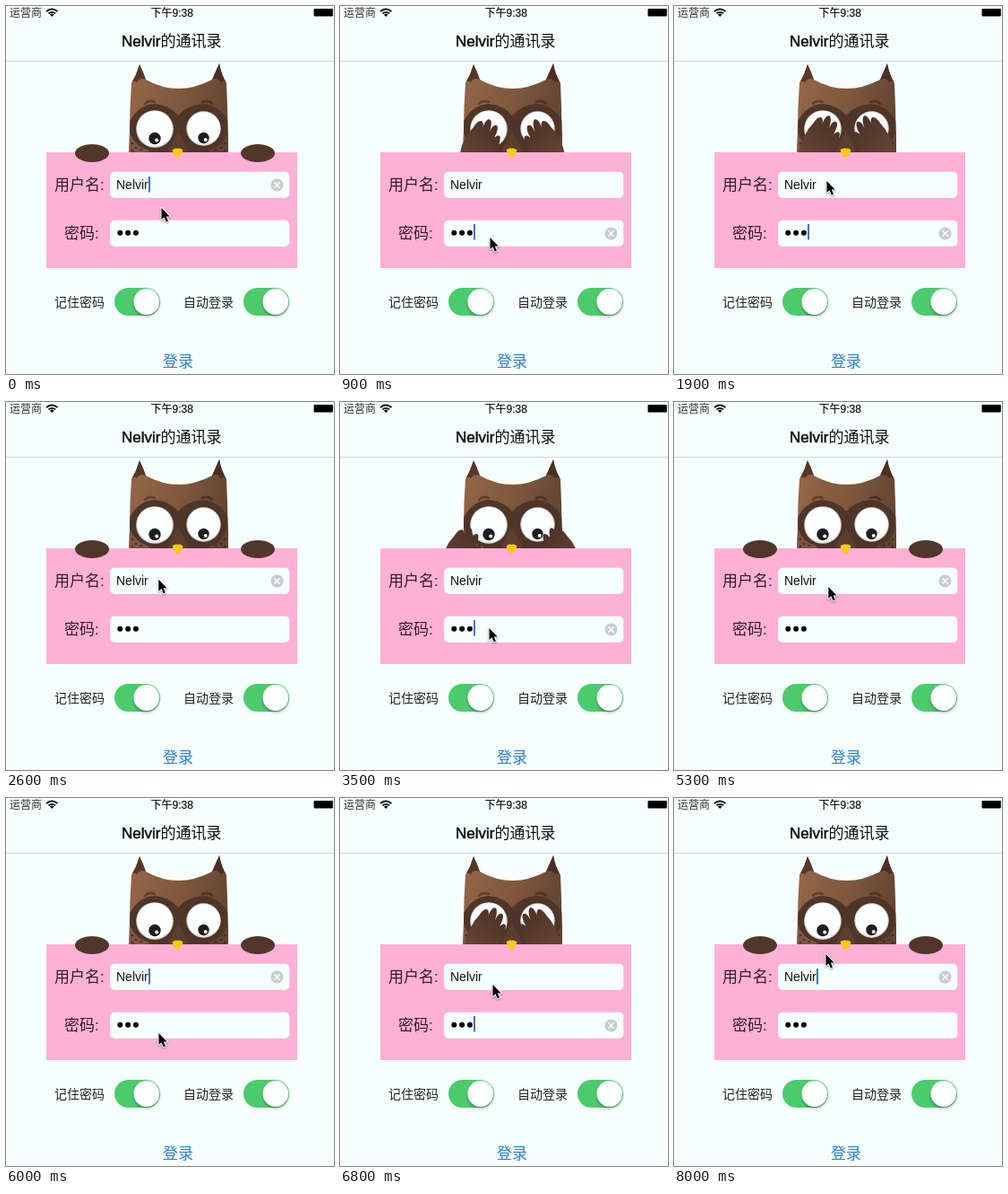
Animation, 366 px wide and 410 px high, one loop 8100 ms. Source, as an HTML page with a canvas:

```html
<!DOCTYPE html>
<html lang="zh">
<head>
<meta charset="utf-8">
<title>登录</title>
<style>
html, body { margin: 0; width: 100%; height: 100%; overflow: hidden; background: #f5fffe; }
canvas { display: block; width: 366px; height: 410px; }
</style>
</head>
<body>
<canvas id="stage"></canvas>
<script>
const W = 366, H = 410, LOOP = 8100;
const USER = 'Nelvir';
const PAPER = '#f5fffe', PINK = '#ffb0d6', GREEN = '#4ccb6d', DARK = '#51372a';
const FONT = '"Liberation Sans", "Noto Sans CJK SC", "Noto Sans CJK", sans-serif';

const canvas = document.getElementById('stage');
const c = canvas.getContext('2d');
const dpr = window.devicePixelRatio || 1;
canvas.width = W * dpr;
canvas.height = H * dpr;

// Focus moves between the fields; each change raises or lowers the wings.
const MOVE = 400;
const focusAt = [[580, 'pass'], [2020, 'user'], [3290, 'pass'],
                 [4530, 'user'], [6060, 'pass'], [7320, 'user']];
const caretOff = [[200, 580], [1050, 1400], [2520, 2900], [3780, 4080],
                  [5150, 5500], [7000, 7320], [7700, 8000]];
// time, x, y of the pointer tip
const pointer = [[0, 173, 224], [300, 167, 257], [1100, 167, 257], [1900, 170, 194],
                 [2500, 170, 194], [3250, 166, 251], [3800, 166, 251], [4400, 172, 198],
                 [5100, 172, 198], [5900, 171, 243], [6000, 170, 261], [6300, 170, 261],
                 [6800, 170, 207], [7000, 169, 192], [7900, 169, 192], [8000, 169, 173]];

const clamp = v => Math.max(0, Math.min(1, v));
const ease = v => v * v * (3 - 2 * v);

function fill(color, draw) {
  c.beginPath();
  draw();
  c.fillStyle = color;
  c.fill();
}

function ellipse(x, y, rx, ry, color) {
  fill(color, () => c.ellipse(x, y, rx, ry, 0, 0, 7));
}

function rounded(x, y, w, h, r, color) {
  fill(color, () => c.roundRect(x, y, w, h, r));
}

function line(color, width, d) {
  c.strokeStyle = color;
  c.lineWidth = width;
  c.lineCap = 'round';
  c.stroke(new Path2D(d));
}

function shape(color, d) {
  c.fillStyle = color;
  c.fill(new Path2D(d));
}

function text(str, x, y, size, color = '#111', weight = 300, bold = 0) {
  c.font = weight + ' ' + size + 'px ' + FONT;
  c.fillStyle = c.strokeStyle = color;
  c.fillText(str, x, y);
  if (bold) {
    c.lineWidth = bold;
    c.strokeText(str, x, y);
  }
  return c.measureText(str).width;
}

function statusBar() {
  text('运营商', 4, 11.5, 12, '#333');
  for (const r of [9.5, 6.2]) {
    c.beginPath();
    c.arc(51.3, 12, r - 1, -Math.PI * 0.76, -Math.PI * 0.24);
    c.strokeStyle = '#111';
    c.lineWidth = 1.8;
    c.lineCap = 'butt';
    c.stroke();
  }
  shape('#111', 'M51.3 12 L48.9 9.6 Q51.3 7.6 53.7 9.6 Z');
  text('下午9:38', 161.5, 11.5, 12, '#111', 400, 0.2);
  const nameWidth = text(USER, 129, 45, 17, '#111', 400, 0.5);
  text('的通讯录', 129 + nameWidth, 45, 17, '#111', 400);
  rounded(343.5, 3, 21.3, 8.5, 1, '#000');
  c.fillStyle = '#d0d8d7';
  c.fillRect(0, 61, W, 1);
}

function eye(x, y, r, pupil) {
  ellipse(x, y, r, r, '#d5dbda');
  ellipse(x, y - 0.3, r - 1.2, r - 1.2, '#fdffff');
  ellipse(x, y + 10.5, pupil, pupil, '#201d1d');
  ellipse(x + 2.2, y + 12.5, 2, 2, '#f5f7f7');
}

function owl() {
  const coat = c.createLinearGradient(138, 90, 248, 120);
  coat.addColorStop(0, '#936648');
  coat.addColorStop(0.5, '#80583d');
  coat.addColorStop(1, '#624533');
  shape(coat, 'M137.5 164 L138.5 112 L140 86 Q146 76 149 65 Q153 73 156 82 ' +
    'Q192 102 230 82 Q234 73 238 64 Q240 76 246 86 L247 112 L248 164 Z');
  shape('#553829', 'M140 86 Q146 76 149 65 Q153 73 156 82 Q150 79 146 85 Q142 82 140 86 Z');
  shape('#492f24', 'M246 86 Q240 76 238 64 Q234 73 230 82 Q236 79 240 85 Q244 82 246 86 Z');
  line('#60402e', 2.5, 'M155 109 Q159 104 166 107');
  line('#4f3326', 2.5, 'M230 109 Q226 104 219 107');
  shape('#4f3527', 'M138.3 128 Q148 110 166 109 Q184 111 192 122 ' +
    'Q201 111 219 109 Q238 110 247.3 128 L248 164 L137.5 164 Z');
  shape('#7d563e', 'M138 140 Q143 156 158 160 L161 164 L137.5 164 Z');
  shape('#614331', 'M247.6 140 Q242 156 228 160 L225 164 L248 164 Z');
  shape('#5a3e2e', 'M192 140 Q184 152 180 164 L204 164 Q200 152 192 140 Z');
  for (const [x, y] of [[141, 153], [145, 158], [151, 160], [141, 161]]) {
    ellipse(x, y, 1.5, 1.3, '#4d3326');
    ellipse(385 - x, y, 1.5, 1.3, '#432c22');
  }
  eye(166, 137, 20.8, 6.7);
  eye(220.5, 136.5, 19.2, 6.2);
}

// Feathered hand in its own 45 x 65 box; the right one is mirrored.
function wing(x, y, flip) {
  c.save();
  c.translate(x, y);
  c.scale(flip, 1);
  const down = c.createLinearGradient(0, 46, 38, 10);
  down.addColorStop(0, '#644734');
  down.addColorStop(1, '#4c3226');
  shape(down, 'M-1 65 Q-2 38 6 27 Q9 20 15 14 Q20 6 24 7 Q28 9 24 18 ' +
    'Q28 5 33 5 Q37 7 33 19 Q37 10 41 12 Q44 15 38 26 Q43 21 45 25 ' +
    'Q44 38 36 46 L33 65 Z');
  c.restore();
}

function wings(p) {
  const q = 1 - p;
  c.save();
  c.beginPath();
  c.rect(0, 62, W, 101);
  c.clip();
  wing(140 - 60 * q, 117 + 40 * q, 1);
  wing(245.5 + 50 * q, 117 + 40 * q, -1);
  c.restore();
}

function clearButton(y) {
  ellipse(302.5, y, 7, 7, '#c9cccc');
  line('#fff', 1.5, `M299.8 ${y - 2.7} l5.4 5.4 m0 -5.4 l-5.4 5.4`);
}

function form(focus, caret) {
  c.fillStyle = PINK;
  c.fillRect(45, 163, 280, 129);
  for (const y of [184.5, 238.5]) {
    rounded(116, y, 200.5, 29.5, 5, '#f3e4ec');
    rounded(116.6, y + 0.6, 199.3, 28.3, 4.5, PAPER);
  }
  text('用户名:', 54, 205, 17, '#321c28');
  text('密码', 65, 259, 17, '#321c28');
  text(':', 99, 259, 17, '#321c28');
  text(USER, 123, 204, 14);
  for (let i = 0; i < 3; i++) ellipse(127.3 + 8.8 * i, 252.8, 3, 3, '#000');

  const onUser = focus === 'user';
  clearButton(onUser ? 199.5 : 253.5);
  if (caret) {
    c.fillStyle = '#476fd0';
    c.fillRect(onUser ? 159 : 149, onUser ? 190 : 243, 2, 17.5);
  }
}

function toggle(x) {
  rounded(x, 314, 51, 31, 15.5, GREEN);
  c.save();
  c.shadowColor = 'rgba(0,0,0,.3)';
  c.shadowBlur = 3 * dpr;
  c.shadowOffsetY = 2 * dpr;
  ellipse(x + 35.8, 329.5, 14.4, 14.4, '#fbffff');
  c.restore();
}

function arrow(x, y) {
  c.save();
  c.translate(x - 0.5, y);
  c.lineJoin = 'round';
  const tip = 'M1 1 V14 L4 11.2 L6.3 16.4 L8.5 15.5 L6.3 10.4 H10.2 Z';
  c.shadowColor = 'rgba(0,0,0,.4)';
  c.shadowBlur = 2 * dpr;
  c.shadowOffsetY = dpr;
  line('#fff', 2, tip);
  c.shadowColor = 'transparent';
  shape('#000', tip);
  c.restore();
}

function pointerPos(t) {
  const i = pointer.findIndex(k => k[0] > t);
  if (i < 0) return pointer[pointer.length - 1].slice(1);
  const [t0, x0, y0] = pointer[i - 1], [t1, x1, y1] = pointer[i];
  const k = ease((t - t0) / (t1 - t0));
  return [x0 + (x1 - x0) * k, y0 + (y1 - y0) * k];
}

function render(t) {
  let focus = 'user', raise = 0;
  for (const [at, name] of focusAt) {
    if (t < at) break;
    focus = name;
    const k = ease(clamp((t - at) / MOVE));
    raise = name === 'pass' ? k : 1 - k;
  }
  const caret = !caretOff.some(([a, b]) => t >= a && t < b);

  c.setTransform(dpr, 0, 0, dpr, 0, 0);
  c.fillStyle = PAPER;
  c.fillRect(0, 0, W, H);
  statusBar();
  owl();
  if (raise > 0) wings(raise);
  form(focus, caret);
  shape('#fcc70f', 'M185.5 160.5 Q188 158 191.5 158.8 Q195 158 197.5 160.5 Q196 166 191.5 169.5 Q187 166 185.5 160.5 Z');

  const paw = clamp(1 - 2.4 * raise);
  if (paw > 0) {
    ellipse(96, 164, 19 * paw, 10 * paw, DARK);
    ellipse(281, 164, 19 * paw, 10 * paw, DARK);
  }

  text('记住密码', 54, 334.5, 14, '#222');
  text('自动登录', 198, 334.5, 14, '#222');
  toggle(121);
  toggle(265);
  text('登录', 175, 401.5, 17, '#2a7fd8');
  arrow(...pointerPos(t));
}

const start = performance.now();
function tick() {
  render((performance.now() - start) % LOOP);
  requestAnimationFrame(tick);
}
tick();
</script>
</body>
</html>
```
